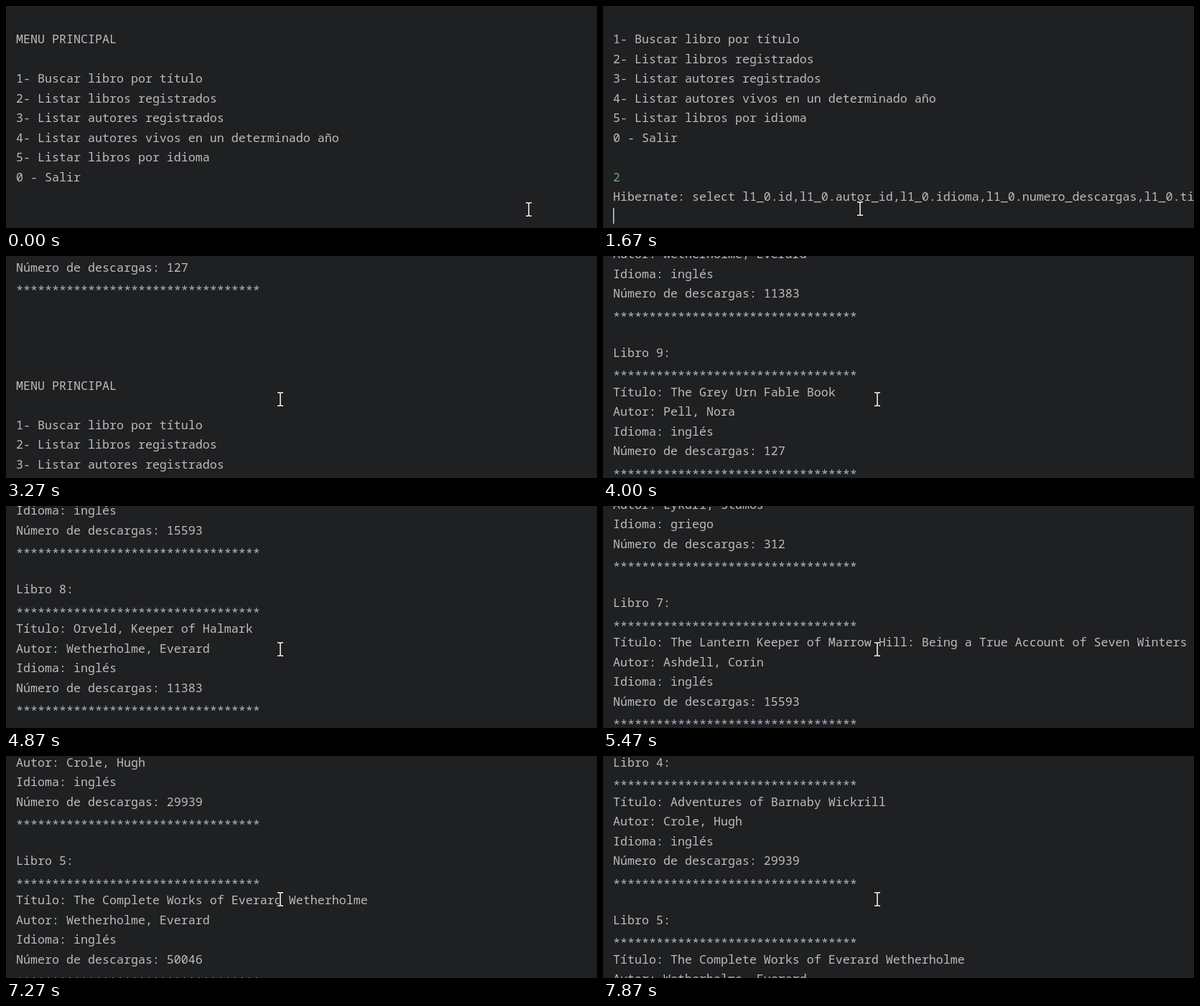
An HTML page that plays this animation: 823 by 310 pixels, repeating every 8000 ms.

```html
<!DOCTYPE html>
<html lang="es">
<head>
<meta charset="utf-8">
<title>Menu principal</title>
<style>
  html, body { margin: 0; width: 100%; height: 100%; overflow: hidden; background: #1f2022; }
  svg { display: block; width: 823px; height: 310px; overflow: hidden; }
  text { font: 16.667px "Noto Sans Mono", "DejaVu Sans Mono", monospace; fill: #bcbcbd; white-space: pre; }
  .stars { fill: #b0bac4; }
  .input { fill: #6aab73; }
  #caret { fill: #ced0d6; }
  #pointer path { fill: none; stroke: #fff; stroke-width: 1.5; }
  #pointer path:first-child { stroke: #1a1a1c; stroke-width: 3.5; }
</style>
</head>
<body>
<svg viewBox="0 0 823 310">
  <g id="rows"></g>
  <rect id="caret" width="1.5" height="22"/>
  <g id="pointer"></g>
</svg>
<script>
const LOOP = 8000, TICKS_PER_MS = 0.015;
const LEFT = 14, CHAR = 10, PITCH = 27.5, HEIGHT = 310;
const STARS = '*'.repeat(34);

const books = [
  ['Adventures of Barnaby Wickrill', 'Crole, Hugh', 'inglés', 29939],
  ['The Complete Works of Everard Wetherholme', 'Wetherholme, Everard', 'inglés', 50046],
  ['Λυκάρη Αλυσίδες Τόμος Γ', 'Lykari, Stamos', 'griego', 312],
  ['The Lantern Keeper of Marrow Hill: Being a True Account of Seven Winters', 'Ashdell, Corin', 'inglés', 15593],
  ['Orveld, Keeper of Halmark', 'Wetherholme, Everard', 'inglés', 11383],
  ['The Grey Urn Fable Book', 'Pell, Nora', 'inglés', 127]
];
const menu = [
  'MENU PRINCIPAL', '',
  '1- Buscar libro por título',
  '2- Listar libros registrados',
  '3- Listar autores registrados',
  '4- Listar autores vivos en un determinado año',
  '5- Listar libros por idioma',
  '0 - Salir', ''
];
const lines = [
  ...books.flatMap(([title, author, language, count], i) => [
    '', `Libro ${i + 4}:`, STARS, `Título: ${title}`, `Autor: ${author}`,
    `Idioma: ${language}`, `Número de descargas: ${count}`, STARS
  ]),
  '', '', '', '', ...menu
];
const INPUT = lines.length;
const QUERY = 'Hibernate: select l1_0.id,l1_0.autor_id,l1_0.idioma,l1_0.numero_descargas,l1_0.titulo from libros l1_0';

// All keys are in ticks of 1/15 s.
const scrollKeys = [
  [0, 1383.9], [24, 1383.9], [25, 1438.9], [27, 1438.9], [28, 1100], [29, 1383.9],
  [37, 1383.9], [39, 1366.2], [45, 1251], [47, 1251], [51, 1248], [55, 1248],
  [60, 992.7], [68, 797], [72, 797], [73, 791.2], [75, 764], [77, 764],
  [90, 213.7], [92, 195], [93, 195], [96, 176], [104, 176], [109, 101.3],
  [114, 101.3], [118, 18.6]
];
const pointerKeys = [
  [0, 728, 284], [1, 690, 270], [2, 600, 258], [3, 500, 257], [4, 420, 268],
  [5, 370, 280], [6, 356, 283], [9, 356, 283], [10, 358, 283], [33, 358, 283],
  [38, 382, 200]
];
// from, to, row, column
const caretSpans = [[5, 14, 0, 0], [17, 25, 0, 1], [25, 28, 2, 0], [29, 37, 0, 0]];

function sample(keys, k) {
  const i = keys.findIndex(key => key[0] > k);
  if (i < 0) return keys[keys.length - 1].slice(1);
  const a = keys[i - 1], b = keys[i], p = (k - a[0]) / (b[0] - a[0]);
  return a.slice(1).map((v, j) => v + (b[j + 1] - v) * p);
}

function lineAt(row, k) {
  if (row === INPUT && k >= 17 && k < 28) return '2';
  if (row === INPUT + 1 && k >= 25 && k < 28) return QUERY;
  return lines[row] || '';
}

const make = (tag, parent) =>
  parent.appendChild(document.createElementNS('http://www.w3.org/2000/svg', tag));
const byId = id => document.getElementById(id);
const rowsBox = byId('rows'), caret = byId('caret'), pointer = byId('pointer');

const pool = Array.from({ length: 14 }, () => {
  const el = make('text', rowsBox);
  el.setAttribute('x', LEFT);
  return el;
});
for (let i = 0; i < 2; i++) {
  make('path', pointer).setAttribute('d',
    'M-4-9.3h2.6l1.4 1 1.4-1h2.6M0-8.3V8.3M-4 9.3h2.6l1.4-1 1.4 1h2.6');
}

function draw(k) {
  const [scroll] = sample(scrollKeys, k);
  const first = Math.floor(scroll / PITCH) - 1;
  const middle = row => Math.round(row * PITCH - scroll);

  pool.forEach((el, i) => {
    const row = first + i, line = lineAt(row, k), stars = line === STARS;
    if (el.textContent !== line) el.textContent = line;
    el.setAttribute('class', stars ? 'stars' : row === INPUT ? 'input' : '');
    el.setAttribute('y', middle(row) + (stars ? 11 : 6));
  });

  const span = caretSpans.find(([from, to]) => k >= from && k < to);
  caret.style.display = span ? '' : 'none';
  if (span) {
    caret.setAttribute('x', LEFT + span[3] * CHAR);
    caret.setAttribute('y', middle(INPUT + span[2]) - 12);
  }

  const [x, y] = sample(pointerKeys, k).map(Math.round);
  pointer.setAttribute('transform', `translate(${x} ${y})`);
}

const start = performance.now();
let last = -1;
function frame() {
  const t = (performance.now() - start) % LOOP;
  const k = Math.floor(t * TICKS_PER_MS + 0.1) % 120;
  if (k !== last) draw(last = k);
  requestAnimationFrame(frame);
}
frame();
</script>
</body>
</html>
```
